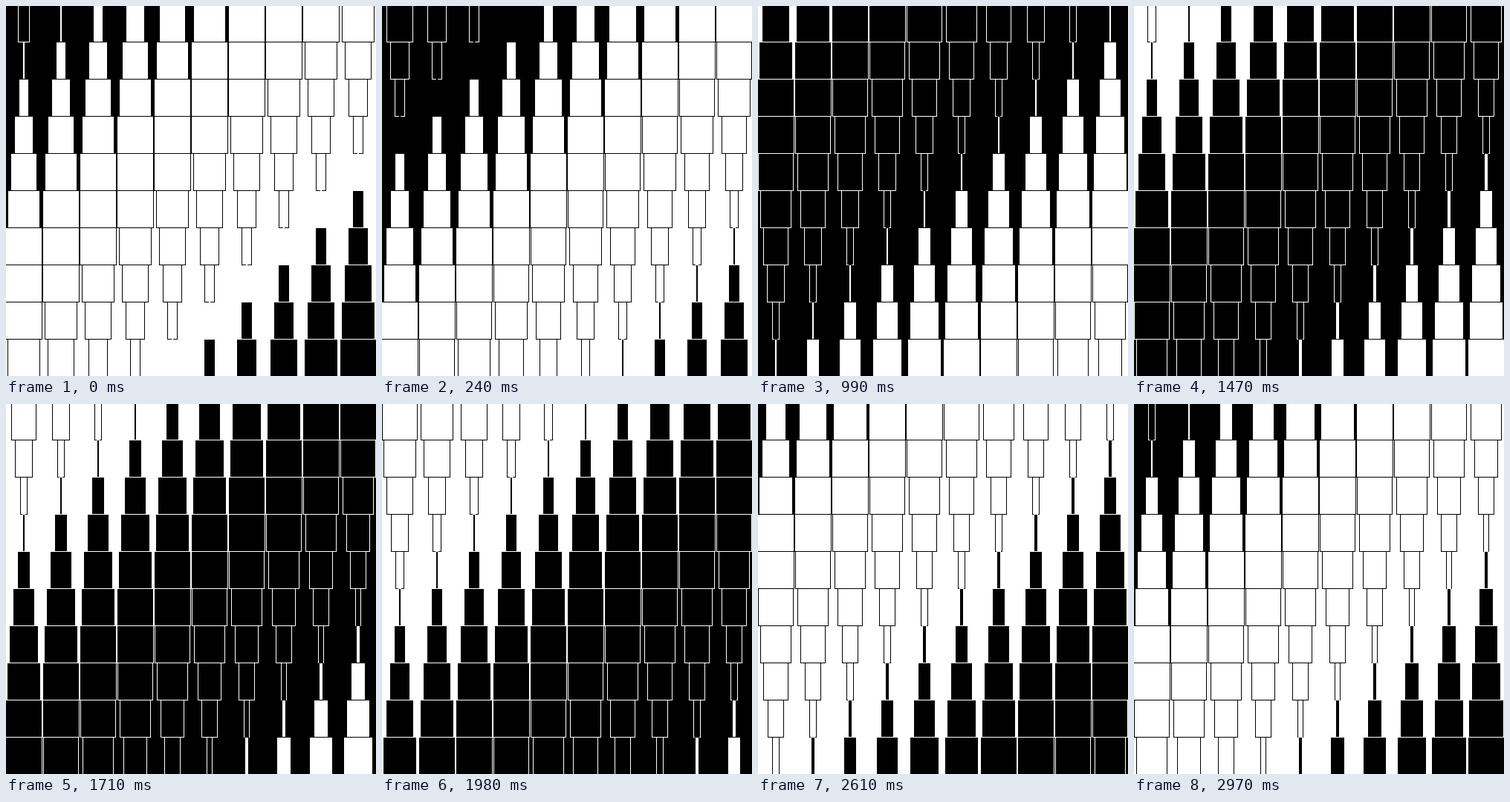
These frames come from a looping animation (498 by 498 pixels, 3000 ms). An HTML page with a canvas:

```html
<!DOCTYPE html>
<html lang="en">
<head>
<meta charset="utf-8">
<title>Flipping cards</title>
<style>
  html, body { margin: 0; width: 100%; height: 100%; overflow: hidden; background: #fff; }
  canvas { display: block; width: 498px; height: 498px; }
</style>
</head>
<body>
<canvas id="stage" width="498" height="498"></canvas>
<script>
const ctx = document.getElementById('stage').getContext('2d');
const LOOP = 3000, TICK = 30;
const GRID = 10, CELL = 50;
const LAG = 15.2; // degrees between neighbouring diagonals

// time in ms, turn in degrees
const TURN = [
  [0, 16.4], [510, 77.2], [990, 132.7], [1470, 192.6],
  [1980, 253.6], [2280, 287], [2970, 371.1], [3000, 376.4]
];

function turnAt(t) {
  const i = TURN.findIndex(([end]) => t < end);
  const [t0, a0] = TURN[i - 1], [t1, a1] = TURN[i];
  return a0 + (a1 - a0) * (t - t0) / (t1 - t0);
}

function box(color, x, y, w, h) {
  ctx.fillStyle = color;
  ctx.fillRect(x, y, w, h);
}

function eachCell(turn, paint) {
  for (let row = 0; row < GRID; row++) {
    for (let col = 0; col < GRID; col++) {
      paint(col * CELL, row * CELL, ((row + col) * LAG - turn) * Math.PI / 180);
    }
  }
}

function ground(x, y, angle) {
  box(Math.cos(angle) > 0 ? '#000' : '#fff', x - 1, y - 1, CELL, CELL);
}

// Half widths snap to whole pixels so every outline stays crisp.
function card(x, y, angle) {
  const turn = Math.sin(angle);
  const half = Math.min(24, Math.floor(25 * Math.abs(turn)));
  const [face, edge] = turn > 0 ? ['#fff', '#000'] : ['#000', '#fff'];
  const mid = x + 24;
  box(edge, mid - half - 1, y - 2, 2 * half + 2, CELL + 1);
  box(face, mid - half, y - 1, 2 * half, CELL - 1);
}

const start = performance.now();

function draw() {
  const t = (performance.now() - start) % LOOP;
  const turn = turnAt(Math.floor(t / TICK) * TICK);
  eachCell(turn, ground);
  eachCell(turn, card);
  requestAnimationFrame(draw);
}
draw();
</script>
</body>
</html>
```
